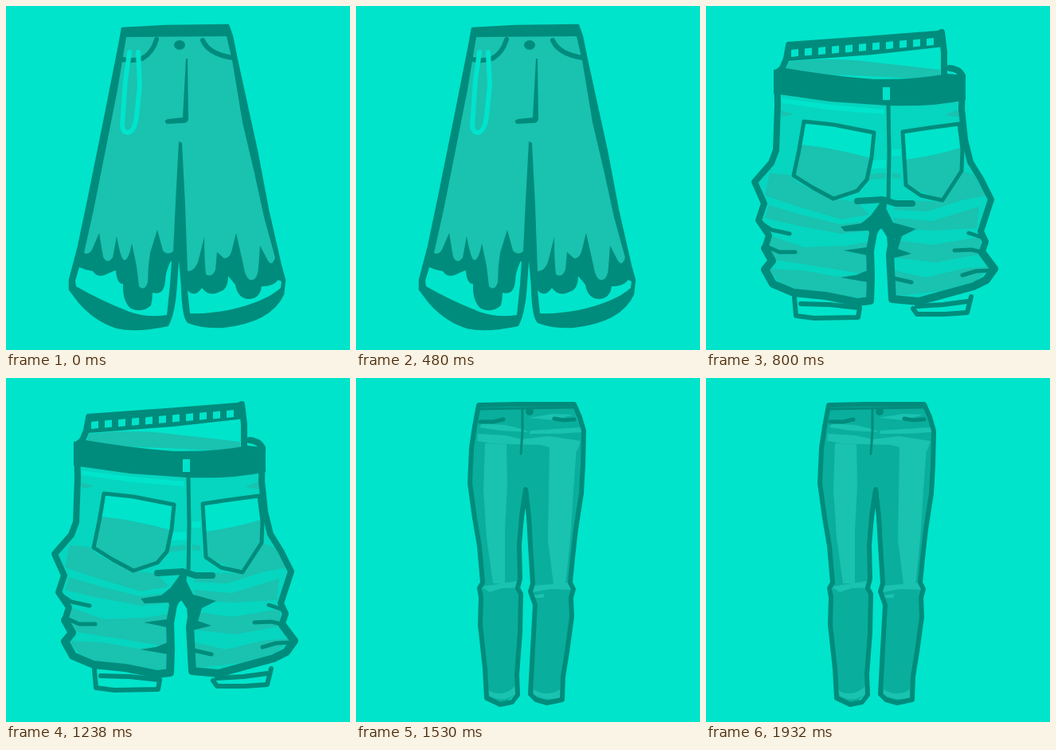
Write an HTML page that moves like this. It is 432 px wide and 432 px high and loops after 2200 ms.

```html
<!DOCTYPE html>
<html lang="en">
<head>
<meta charset="utf-8">
<title>Trousers</title>
<style>
  html, body { margin: 0; width: 100%; height: 100%; overflow: hidden; background: #00e4cb; }
  svg { display: block; width: 100vw; height: 100vh; }
  .look { opacity: 0; }
  .bg { fill: #00e4cb; }
  .pale { fill: #06d5bf; }
  .mid { fill: #1ac2b0; }
  .deep { fill: #0aae9c; }
  .dark { fill: #008c7c; }
  .line { fill: none; stroke: #008c7c; stroke-width: 6; stroke-linecap: round; stroke-linejoin: round; }
  .glow { fill: none; stroke: #00e4cb; stroke-width: 6; stroke-linecap: round; stroke-linejoin: round; }
  .hull { stroke: #008c7c; stroke-width: 2.5; stroke-linejoin: round; }
</style>
</head>
<body>
<svg viewBox="0 0 432 432">

  <g class="look" id="flared">
    <path class="dark hull" d="M146 28L200 25L279 24L284 38L290 68L315 182L329 256L345 326L350 344L348 362C337 386 310 399 272 403Q247 404 229 397Q222 392 221 350L217 305L214 345Q212 385 203 401Q165 409 140 404Q113 396 92 372L80 356L80 344L91 302L104 240L124 141L142 50Z"/>
    <!-- bare ankles -->
    <path class="bg" d="M92 328Q100 332 109 333Q116 343 128 336Q134 333 138 332Q139 349 147 349Q146 371 157 380Q171 386 182 376Q184 368 184 360Q198 364 200 346Q200 335 206 322L208 320L206 350L202 388Q178 392 155 384Q117 369 88 352L87 345Z"/>
    <path class="bg" d="M228 357Q237 367 246 354Q255 366 268 359Q279 356 279 339L288 350Q291 368 306 368Q319 367 321 352Q334 353 342 344L346 346L345 354Q325 372 279 382Q252 387 231 386Z"/>
    <!-- dyed cloth with drips -->
    <path class="mid" d="M151 39L277 38L284 68L297 146L312 210L324 265L338 316Q334 328 329 320L319 301Q318 316 317 328Q316 344 308 344Q301 344 298 325L289 285L283 309Q280 317 274 317L265 309L263 331Q259 342 251 337Q249 320 249 290L242 318Q238 333 228 333L225 250L221 172L217 170L213 245L210 308Q203 314 197 307L190 281L181 310Q178 328 178 347Q174 359 167 352L164 327L158 298Q154 320 148 319Q144 317 139 289L134 316Q127 325 122 315L117 285L108 306Q104 313 98 310L110 256L125 181L140 105Z"/>
    <path class="line" d="M189 42Q184 59 171 66Q160 70 146 67M247 43Q254 60 284 65"/>
    <ellipse class="dark" cx="218" cy="49" rx="7" ry="6"/>
    <path class="dark" d="M226 66L228 66L229 141Q229 147 222 147L202 148Q197 144 203 142L222 140Z"/>
    <path class="glow" d="M155 58L150 93L146 150Q147 160 154 159Q162 156 164 138L168 100L166 58"/>
  </g>

  <g class="look" id="baggy">
    <!-- raised back waistband -->
    <path class="bg" d="M102 48L297 33L300 92L96 92Z"/>
    <path class="mid" d="M104 70Q160 64 205 70L294 80L294 92L100 84Z"/>
    <path class="dark" d="M102 45L200 38L290 31L298 29L300 51L210 61L104 69Z"/>
    <g id="slots" class="bg"></g>
    <path class="line" style="stroke-width:8" d="M104 49L101 66L96 78L89 84M296 33L299 58L299 90M306 78Q321 80 322 90"/>

    <path class="pale" d="M89 90L89 180L83 196L61 222L73 248L66 269L79 288L73 304L82 320L73 331L83 349L110 361L150 365L206 371L207 300L219 268L232 290L233 368L267 371L303 361L336 352L362 330L347 308L351 296L345 283L358 243L345 215L332 195L322 90Z"/>
    <g class="bg">
      <path d="M94 116L150 123L224 130L224 136L160 131L96 122Z"/>
      <path d="M207 194L226 193L226 203L205 205ZM233 180L245 180L244 188L233 188Z"/>
    </g>
    <g class="mid">
      <path d="M93 131L111 136L96 139ZM312 132L321 129L321 140L300 137Z"/>
      <path d="M80 210L104 212L116 222L154 241L189 246L205 262L170 268L116 252L74 238Z"/>
      <path d="M79 250L119 262L168 274L204 270L204 282L170 286L116 276L74 266Z"/>
      <path d="M83 289L123 303L176 301L205 296L206 338L165 331L82 318L76 304Z"/>
      <path d="M78 330L121 332L165 340L206 336L206 368L154 361L99 354Z"/>
      <path d="M323 208L338 213L352 238L321 244L278 258L235 256L248 244L299 246Z"/>
      <path d="M235 266L284 270L343 252L340 279L284 282L240 279Z"/>
      <path d="M240 294L284 300L345 290L343 312L288 322L236 316Z"/>
      <path d="M236 332L276 341L322 330L357 327L338 346L294 358L240 364Z"/>
      <path d="M204 211L226 210L226 216L201 219ZM234 209L244 211L244 217L234 216Z"/>
    </g>

    <!-- pockets -->
    <path class="bg" d="M123 144L211 158L202 218L190 232L160 243L110 213Z"/>
    <path class="mid" d="M119 174Q160 178 207 191L202 218L190 232L160 243L111 212Z"/>
    <path class="bg" d="M247 158L318 148L321 207L296 244L251 225Z"/>
    <path class="mid" d="M250 193Q287 188 320 178L321 207L296 244L251 225Z"/>
    <path class="line" style="stroke-width:5" d="M123 145L160 149L211 159L208 190L202 218L190 232L160 242L134 228L110 213L117 180ZM247 158L280 153L318 148L322 180L321 207L297 244L270 238L251 225Z"/>

    <path class="dark" d="M85 80L100 78Q150 87 210 92Q262 93 303 85L325 87L326 118Q285 127 227 125L156 120L85 110Z"/>
    <path class="bg" d="M222 102L231 102L231 118L222 118Z"/>
    <path class="line" style="stroke-width:5" d="M229 125L230 185L229 246"/>
    <path class="line" style="stroke-width:8" d="M190 245L222 243L238 248L259 248"/>
    <path class="line" style="stroke-width:8" d="M89 84L90 125L88 181L82 197L61 221L73 248L66 269L79 288L74 304L82 320M347 308L351 296L345 283L358 243L345 217L332 196L325 168L321 130L322 88"/>
    <path class="line" style="stroke-width:10" d="M74 304L83 320L74 331L84 349L110 360L150 364L190 372L206 370L207 340L206 308L210 285L219 268L222 250M219 268L232 288L233 300L231 312L234 368L267 371L303 361L336 352L352 344L362 330L347 310"/>
    <path class="dark" d="M221 244L207 263L195 273L169 277L174 283L204 282L207 290L202 303L173 307L202 313L203 332L188 338L169 341L204 347L210 343L210 300L216 282L223 278L238 293L230 309L234 317L258 311L241 305L246 289L264 280L235 272Z"/>
    <path class="line" style="stroke-width:5" d="M67 271L82 281L105 286M76 302L92 309L112 309M346 309L333 306L312 307M345 290L330 285M358 332L339 333L322 338M236 342L258 347"/>
    <!-- cuffs -->
    <path class="bg" d="M112 367L192 379L191 391L113 389ZM264 378L331 366L329 386L266 388Z"/>
    <path class="line" d="M111 366L113 389L136 392L191 391L193 379L155 375L119 374"/>
    <path class="line" d="M260 380L265 387L300 387L328 385L333 365M265 377L298 375L328 371"/>
  </g>

  <g class="look" id="slim">
    <path class="deep" d="M154 34L274 33L286 66L284 130L275 195L270 262L271 300L264 355L259 404L240 409L219 398L222 340L225 275L219 262L220 205L213 139L207 190L206 262L206 330L203 394L185 411L164 401L156 310L159 262L154 211L143 132L148 66Z"/>
    <g class="mid">
      <path d="M153 70L187 72L209 77L242 73L282 79L278 91L247 88L232 84L193 83L170 82L152 79Z"/>
      <path d="M162 82L189 83L190 135L187 191L187 258L172 258L164 201L160 141Z"/>
      <path d="M243 84L277 87L273 141L270 191L267 223L263 260L248 259L241 204L242 142Z"/>
      <path d="M157 262L202 255L205 263L183 264L168 269ZM221 261L268 257L271 266L244 265L222 269ZM222 273L237 271L235 276L224 276Z"/>
      <path d="M166 392Q184 403 201 386L200 397Q184 409 168 399ZM223 391Q240 402 258 390L256 402Q239 406 223 398Z"/>
      <path d="M158 57L187 59L209 64L217 68L181 66L155 62ZM219 66L282 62L284 68L253 70L218 70ZM217 50L247 45L273 46L248 53Z"/>
    </g>
    <path class="line" d="M154 34L200 33L274 33L281 49L286 66L285 110L283 145L276 190L272 226L269 257L273 265L270 276L271 300L265 344L260 375L259 404L240 408L226 404L219 397L222 340L225 285L219 268L222 258L219 210L217 174L213 140L208 173L205 210L206 252L203 264L207 271L206 320L202 372L203 398L196 407L181 410L164 402L162 365L156 310L157 275L155 264L159 257L155 211L149 176L143 132L145 88L149 61Z"/>
    <path class="dark" d="M212 137Q218 139 217 150L221 190L220 235L216 194L213 160L209 190L206 215L206 175Z"/>
    <path class="line" style="stroke-width:3" d="M156 39L205 38L272 37M209 39L209 67L207 95"/>
    <path class="line" style="stroke-width:5" d="M156 55L172 55L185 52M249 51L260 53L274 52"/>
    <ellipse class="dark" cx="218" cy="42" rx="5" ry="5"/>
  </g>
</svg>

<script>
  const LOOP = 2200;
  const SHOWS = [["flared", 0, 800], ["baggy", 800, 1530], ["slim", 1530, LOOP]];

  // Windows along the tilted waistband
  const slots = document.getElementById("slots");
  for (let i = 0; i < 11; i++) {
    const x = 107 + i * 17, y = 55 - i * 1.4;
    const slot = document.createElementNS("http://www.w3.org/2000/svg", "path");
    slot.setAttribute("d", `M${x} ${y}l9 -1l0 9l-9 1z`);
    slots.append(slot);
  }

  const looks = SHOWS.map(([id, from, to]) => ({ el: document.getElementById(id), from, to }));
  const start = performance.now();

  function draw(now) {
    const t = Math.max(0, now - start) % LOOP;
    for (const { el, from, to } of looks) el.style.opacity = t >= from && t < to ? 1 : 0;
    requestAnimationFrame(draw);
  }
  draw(start);
</script>
</body>
</html>
```
